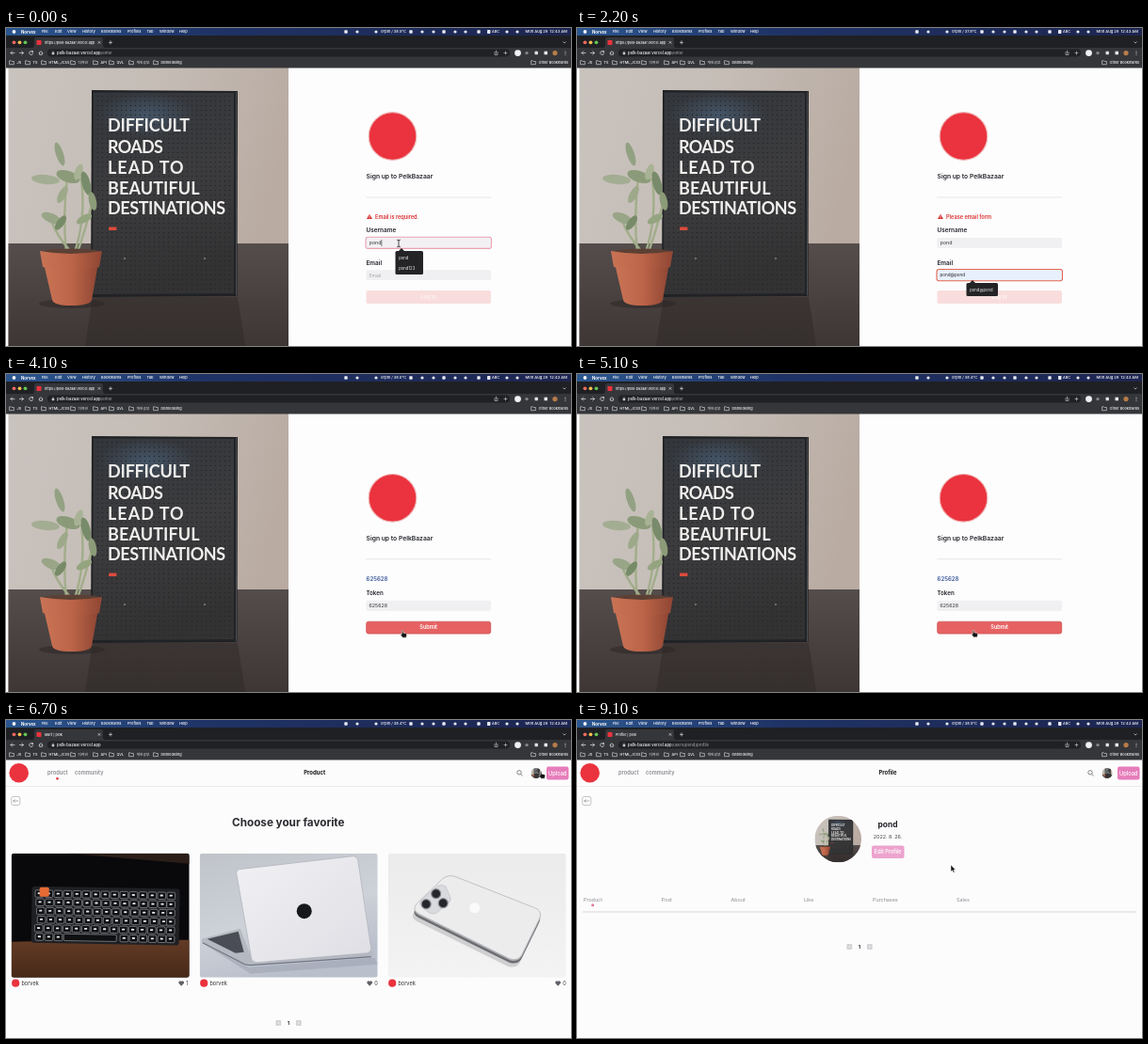
An HTML page for the animation above (9200 ms loop, 600 by 338 pixels).

```html
<!DOCTYPE html>
<html lang="en">
<head>
<meta charset="utf-8">
<title>Market walkthrough</title>
<style>
html, body { margin: 0; width: 100%; height: 100%; overflow: hidden; background: #fdfcfd; }
svg { display: block; width: 600px; height: 338px; font-family: Inter, 'Noto Sans CJK KR', 'Noto Sans CJK', sans-serif; }
text { white-space: pre; }
</style>
</head>
<body>
<svg viewBox="0 0 600 338" xmlns="http://www.w3.org/2000/svg">
<defs>
  <linearGradient id="menubar"><stop stop-color="#2b568f"/><stop offset=".35" stop-color="#1f3366"/><stop offset="1" stop-color="#1d2550"/></linearGradient>
  <linearGradient id="wall" x2="1" y2=".25"><stop stop-color="#c9c3be"/><stop offset=".5" stop-color="#c5bdb6"/><stop offset="1" stop-color="#b9aba2"/></linearGradient>
  <linearGradient id="table" x2="0" y2="1"><stop stop-color="#544d4b"/><stop offset="1" stop-color="#3d3635"/></linearGradient>
  <linearGradient id="board" x2=".2" y2="1"><stop stop-color="#33363b"/><stop offset=".5" stop-color="#3c3c3e"/><stop offset="1" stop-color="#333233"/></linearGradient>
  <radialGradient id="glow"><stop stop-color="#49617a" stop-opacity=".7"/><stop offset="1" stop-color="#49617a" stop-opacity="0"/></radialGradient>
  <linearGradient id="clay" x2="1"><stop stop-color="#c97355"/><stop offset=".5" stop-color="#bd6549"/><stop offset="1" stop-color="#8f4633"/></linearGradient>
  <linearGradient id="wood" x2="0" y2="1"><stop stop-color="#633b25"/><stop offset="1" stop-color="#472919"/></linearGradient>
  <linearGradient id="desk" x2=".4" y2="1"><stop stop-color="#c0c4ca"/><stop offset=".6" stop-color="#cdd1d8"/><stop offset="1" stop-color="#b9bfcb"/></linearGradient>
  <linearGradient id="lid" x2="1" y2="1"><stop stop-color="#f1f1f4"/><stop offset="1" stop-color="#dedee4"/></linearGradient>
  <linearGradient id="paper" x2="0" y2="1"><stop stop-color="#ebebec"/><stop offset="1" stop-color="#f3f3f4"/></linearGradient>
  <linearGradient id="shade" x2="0" y2="1"><stop offset=".66" stop-color="#000" stop-opacity="0"/><stop offset="1" stop-color="#000" stop-opacity=".92"/></linearGradient>
  <pattern id="pegs" width="5" height="5" patternUnits="userSpaceOnUse"><circle cx="2.5" cy="2.5" r=".75" fill="#232427"/></pattern>
  <clipPath id="disc"><circle cx="148" cy="148" r="148"/></clipPath>
  <clipPath id="frame"><rect width="189" height="132" rx="3"/></clipPath>
  <g id="photo"></g>
  <g id="keyboard"></g>
  <g id="laptop">
    <rect width="189" height="132" fill="url(#desk)"/>
    <path d="M4 96L52 121L186 111L189 118L54 128Z" fill="#9ea5b3" opacity=".6"/>
    <path d="M2 91L43 80L56 114L184 104V108Q184 110 180 111L54 119Q50 119 46 117L3 95Z" fill="#b4b8c1"/>
    <path d="M8 91L41 83L47 105L38 106Z" fill="#4a4d55"/>
    <path d="M3 95L46 117Q50 119 54 119L182 110" fill="none" stroke="#6f7481" stroke-width="1.2"/>
    <path d="M42 17L163 3Q167 3 168 7L182 101Q182 105 178 106L61 116Q56 116 55 112L39 21Q39 18 42 17Z" fill="url(#lid)" stroke="#aeb1b9" stroke-width=".7"/>
    <circle cx="111" cy="61.5" r="8" fill="#17181b"/>
  </g>
  <path id="back" d="M31 53L58 27Q64 22 72 25L156 58Q164 61 161 69L142 108Q138 115 129 112L34 65Q24 60 31 53Z"/>
  <g id="phone">
    <rect width="189" height="132" fill="url(#paper)"/>
    <use href="#back" x="-2" y="8" fill="#cfcfd1"/>
    <use href="#back" x="-.3" y="4" fill="#6c6d71"/>
    <use href="#back" y="1.5" fill="#a9aaad"/>
    <use href="#back" fill="#ececed" stroke="#b5b6b9" stroke-width=".8"/>
    <path d="M35 50L52 35Q57 32 61 35L66 46Q68 50 64 53L52 63Q47 66 42 62L35 56Q33 53 35 50Z" fill="#d9dadd" stroke="#bcbdc1" stroke-width=".6"/>
    <g fill="#25262b" stroke="#8d8f95" stroke-width="1.2"><circle cx="51" cy="43" r="5"/><circle cx="40.5" cy="54" r="5"/><circle cx="58.5" cy="53" r="5"/></g>
    <circle cx="92" cy="58" r="5.5" fill="#fafafa"/>
  </g>
</defs>
<g id="stage"></g>
</svg>
<script>
const LOOP = 9200, STEP = 100;
const RED = '#ea333e', GREY = '#8b8b90', INK = '#222429';
const SITE = 'pelk-bazaar.vercel.app';
const $ = id => document.getElementById(id);

// Small drawing helpers: y in text() is the middle of the capitals.
const text = (x, y, size, str, fill = INK, weight = 400, extra = '') =>
  `<text x="${x}" y="${y + size * .36}" font-size="${size}" fill="${fill}" font-weight="${weight}" ${extra}>${str}</text>`;
const centred = (x, y, size, str, fill, weight) => text(x, y, size, str, fill, weight, 'text-anchor="middle"');
const rect = (x, y, w, h, fill, r = 0, extra = '') =>
  `<rect x="${x}" y="${y}" width="${w}" height="${h}" rx="${r}" fill="${fill}" ${extra}/>`;
const dot = (x, y, r, fill, extra = '') => `<circle cx="${x}" cy="${y}" r="${r}" fill="${fill}" ${extra}/>`;
const line = (d, stroke, width = .7) =>
  `<path d="${d}" fill="none" stroke="${stroke}" stroke-width="${width}" stroke-linecap="round" stroke-linejoin="round"/>`;
const during = (t, from, to) => t >= from && t < to;
const latest = (keys, t) => keys.reduce((value, [time, next]) => t >= time ? next : value, keys[0][1]);

function photo() {
  const leaf = (x, y, rx, ry, turn, fill) =>
    `<ellipse cx="${x}" cy="${y}" rx="${rx}" ry="${ry}" fill="${fill}" transform="rotate(${turn} ${x} ${y})"/>`;
  const words = [['DIFFICULT', 104, -.2], ['ROADS', 126.5, -.7], ['LEAD TO', 148.5, 1], ['BEAUTIFUL', 170.5, .1], ['DESTINATIONS', 191.5, -.4]];
  return rect(2.5, 42, 297.5, 296, 'url(#wall)') + rect(2.5, 229, 297.5, 109, 'url(#table)') +
    '<path d="M92 286H246L254 338H84Z" fill="#2e2929" opacity=".5"/>' +
    '<path d="M91 66L246 67L245.5 285L90 286Z" fill="#202225"/><path d="M93 68.5L242 69L242 282L92 283Z" fill="url(#board)"/>' +
    '<ellipse cx="150" cy="92" rx="52" ry="24" fill="url(#glow)"/>' +
    rect(95, 71, 145, 209, 'url(#pegs)') + line('M244.5 68V284', '#53585f', .8) +
    words.map(([s, y, gap]) => text(108, y, 18, s, '#f1efed', 700, `font-family="Lato, sans-serif" letter-spacing="${gap}"`)).join('') +
    rect(109, 211.5, 8.5, 3.5, '#dc4b3d', .8) + dot(126, 245, 1, '#85817e') + dot(211, 245, 1, '#85817e') +
    '<ellipse cx="70" cy="293" rx="35" ry="5" fill="#2b2424" opacity=".5"/>' +
    line('M64 238Q60 202 65 158M73 238Q85 202 80 160M69 238Q54 221 48 205M76 238Q84 216 91 187', '#a1ad8a', 2.4) +
    leaf(57, 134, 4, 13, -18, '#93a183') + leaf(42, 161, 15, 5, 6, '#a3ad92') + leaf(66, 158, 13, 6, 18, '#8b9b79') +
    leaf(77, 153, 4, 9, 20, '#a8b295') + leaf(85, 165, 4.5, 13, -15, '#788b6a') + leaf(60, 177, 4, 10, 28, '#9da98a') +
    leaf(48, 202, 11, 5, 22, '#98a587') + leaf(58, 207, 4, 9, 35, '#778b68') + leaf(83, 203, 9, 4, -28, '#95a480') +
    leaf(92, 184, 4, 10, -12, '#8c9b78') +
    '<path d="M40 250H98L91 289Q89 295 69 295Q51 295 49 289Z" fill="url(#clay)"/>' +
    '<ellipse cx="69" cy="238" rx="31" ry="3.5" fill="#5c4034"/>' +
    '<path d="M36 237Q69 243 102 237L99 254Q69 260 39 254Z" fill="url(#clay)"/>';
}

function keyboard() {
  let keys = '';
  for (let row = 0; row < 6; row++) {
    for (let col = 0; col < 15; col++) {
      if (row === 5 && col > 2 && col < 9) continue;
      const x = 3.5 + col * 10 + (col < 14 ? row % 4 * .9 : 0), y = 4 + row * 9.2;
      keys += rect(x, y, 8.6, 7.4, '#0f1012', 1.2, 'stroke="#b4b7bc" stroke-width=".55"') + rect(x + 2.6, y + 2.5, 3.2, 1.8, '#e4e6ea', .5);
    }
  }
  return rect(0, 0, 189, 132, '#09090b') + '<path d="M60 0H189V11Z" fill="#2b1e19"/>' +
    '<path d="M0 94Q80 92 189 92V132H0Z" fill="url(#wood)"/>' +
    `<g transform="translate(22 35) rotate(1)">${rect(0, 0, 157, 60, '#1f2023', 3)}${keys}` +
    rect(34.5, 50, 56, 7.2, '#0f1012', 1.2, 'stroke="#b4b7bc" stroke-width=".55"') + '</g>' +
    rect(30, 36, 10, 10, '#e56a35', 1.5);
}

const roundPhoto = (x, y, r) =>
  `<g transform="translate(${x - r} ${y - r}) scale(${r / 148})" clip-path="url(#disc)"><use href="#photo" x="-2.5" y="-42"/></g>`;

function browser(t) {
  const heat = latest([[0, '38.5'], [1600, '37.8'], [3100, '38.0'], [5100, '38.4'], [8000, '38.5']], t);
  const title = latest([[0, 'https://' + SITE], [6000, 'Mart | pelk'], [7400, 'https://' + SITE], [7700, 'Profile | pelk']], t);
  const path = latest([[0, '/enter'], [5600, ''], [7400, '/users/pond/profile']], t);
  const menu = [['File', 38], ['Edit', 52], ['View', 65], ['History', 81], ['Bookmarks', 101], ['Profiles', 129], ['Tab', 149.5], ['Window', 163], ['Help', 184]];
  const marks = [['JS', 6], ['TS', 23], ['HTML,JCSS', 40], ['디자인', 71], ['API', 95], ['QVL', 112], ['개인공부', 133], ['DBmodeling', 159], ['Other Bookmarks', 560]];
  const icons = [361, 373, 393, 430, 442, 454, 465, 477, 488, 502, 532, 543];
  const folder = x => line(`M${x - 2} 34.8h1.5l.7.7h2.2v3.2h-4.4z`, '#e4e5e8', .6);
  return rect(0, 0, 600, 8, 'url(#menubar)') + dot(8.5, 4, 1.9, '#f4f4f8') + text(16, 4, 4.4, 'Norvex', '#fff', 700) +
    menu.map(([s, x]) => text(x, 4, 4, s, '#fff', 500)).join('') +
    icons.map((x, i) => i % 3 ? dot(x, 4, 1.6, '#e8eaf4') : rect(x - 1.7, 2.3, 3.4, 3.4, '#e8eaf4', .8)).join('') +
    text(398, 4, 4, `0rpm / ${heat}°C`, '#fff', 500) + rect(511, 2, 3.4, 3.9, '#e8eaf4', .6) +
    text(516, 4, 3.8, 'ABC', '#fff', 500) + text(551.5, 4, 4.1, 'Mon Aug 29  12:43 AM', '#fff', 500) +
    rect(0, 8, 600, 13, '#1f2023') + dot(8.5, 15.3, 1.9, '#ee6a5f') + dot(14.5, 15.3, 1.9, '#f5bd4f') + dot(20.5, 15.3, 1.9, '#61c454') +
    '<path d="M28 21Q30 21 30 18V12Q30 10 32 10H101Q103 10 103 12V18Q103 21 105 21Z" fill="#35363a"/>' +
    rect(32.5, 12.9, 5, 5, RED, .7) + text(41, 15.4, 3.7, title, '#f1f1f3', 500) +
    line('M98 14.4l2 2m0-2l-2 2M111 13.8v3.2m-1.6-1.6h3.2M591.7 14.8l1.3 1.3l1.3-1.3', '#d8d9dc') +
    rect(0, 21, 600, 21.5, '#35363a') + rect(44, 22.5, 491, 8, '#202124', 4) +
    line('M9 26.5H5m1.7-1.7L5 26.5l1.7 1.7M14.5 26.5h4m-1.7-1.7l1.7 1.7l-1.7 1.7M28.5 25.4a2 2 0 1 0 .2 1.7m-.2-2.7v1.2h-1.2M35 26.5l2-1.8l2 1.8m-3.4-.2v2h2.8v-2', '#e4e5e8') +
    rect(48.7, 26, 2.6, 2.2, '#c8c9cc', .3) + line('M49.2 26v-.8q.8-1 1.6 0v.8', '#c8c9cc', .5) +
    `<text x="54" y="28" font-size="4.25" font-weight="500" fill="#f7f7f8">${SITE}<tspan fill="#9a9ca1">${path}</tspan></text>` +
    line('M519 25.5v3h3v-3m-1.5 1.5v-3M529 26.5h3m-1.5-1.6v3.2', '#cfd0d3', .6) + dot(543.5, 26.6, 3.4, '#f1f1f3') +
    dot(553, 26.6, 1.7, '#85878b') + rect(561.5, 24.8, 3.4, 3.4, '#e1e1e4', .6) + rect(571.5, 24.8, 3.5, 3.5, '#ebebee', .3) +
    dot(583, 26.6, 2.6, '#b87c48') + [25, 26.6, 28.2].map(y => dot(594, y, .5, '#ddd')).join('') +
    marks.map(([s, x]) => folder(x) + text(x + 5.5, 37, 3.8, s, '#f4f4f6', 500)).join('');
}

const caret = (x, y) => line(`M${x} ${y - 3}v6`, '#222', .6);

function suggestions(y, width, items) {
  const pitch = 11, height = items.length > 1 ? 25 : 14;
  return `<path d="M417 ${y}l3-3l3 3z" fill="#242426"/>` + rect(413.5, y, width, height, '#242426', 1.5) +
    items.map((s, i) => text(417.3, y + 7 + i * pitch, 4.2, s, '#f2f2f3')).join('');
}

function signup(dy) {
  return '<use href="#photo"/>' + dot(410.5, 115 + dy, 25.3, RED, 'stroke="#efb3b2" stroke-width="1.2"') +
    text(382.5, 158 + dy, 6.75, 'Sign up to PelkBazaar', INK, 600) + line(`M382.5 ${180 + dy}H515`, '#e1e1e4', .8);
}

function loginForm(t) {
  const name = latest([[0, 'pond'], [500, 'pon'], [900, 'pond']], t);
  const email = latest([[0, ''], [1200, 'p'], [1300, 'po'], [1400, 'pon'], [1500, 'pond'], [2000, 'pond@'], [2100, 'pond@po'],
    [2200, 'pond@pond'], [2400, 'pond@pond.'], [2500, 'pond@pond.c'], [2600, 'pond@pond.co'], [2700, 'pond@pond.com']], t);
  const onName = t < 1100, ready = t >= 2700, preview = during(t, 2200, 2400);
  const error = t < 1200 ? 'Email is required.' : 'Please email form';
  const field = (y, focus, fill, ring) => focus
    ? rect(382, y - .8, 133.5, 12.2, fill, 2.5, `stroke="${ring}" stroke-width="1.1"`) : rect(382.5, y, 132.5, 10.8, '#f0f0f2', 1.5);
  const warning = '<path d="M383 203l3-5.2l3 5.2z" fill="#d92d2d"/>' + line('M386 199.7v1.3m0 .9v.1', '#fff', .6) + text(392, 200.5, 5.6, error, '#d92d2d', 600);
  return signup(0) + (ready ? '' : warning) +
    text(382.5, 215, 6.4, 'Username', INK, 600) + field(223, onName, '#f2f0f3', '#eba3b0') + text(385.7, 228.5, 5.3, name, '#333') +
    (onName ? caret(name.length > 3 ? 398.8 : 395.6, 228.5) : '') +
    text(382.5, 249.5, 6.4, 'Email', INK, 600) + field(257.3, !onName, preview ? '#e8f0fe' : '#f3f3f5', '#e5654f') +
    (email ? text(385.5, 262.7, preview ? 4.6 : 5, email, '#222') : text(385.5, 262.7, 5, 'Email', '#a5a5ab')) +
    (during(t, 1500, 1800) ? caret(398, 262.7) : '') +
    rect(382.5, 279, 132.5, 14, ready ? '#e66363' : '#f9dddd', 2) + centred(448.5, 286, 5.5, 'Log in', ready ? '#fff' : '#fdf3f3', 600) +
    (onName ? suggestions(237, 29.5, ['pond', 'pond123']) : during(t, 1200, 2500) ? suggestions(271, 33.5, ['pond@pond']) : '');
}

function tokenForm(t) {
  const code = '625628', typed = code.slice(0, Math.max(0, (t - 3200) / 100));
  return signup(16.8) + text(382.5, 218, 6.1, code, '#3a5899', 600) + text(382.5, 233, 6.2, 'Token', INK, 600) +
    rect(382.5, 240.8, 132.5, 11, '#f0f0f2', 1.5) + text(385.5, 246.4, 5.3, typed || 'Token', typed ? '#333' : '#a5a5ab') +
    rect(382.7, 263.2, 132, 12.8, '#e66262', 2.2, t >= 4000 ? 'stroke="#cf5353" stroke-width=".8"' : '') + centred(448.7, 269.5, 5.5, 'Submit', '#fff', 600);
}

function header(title, active) {
  return rect(0, 42, 600, 296, '#fdfcfd') + line('M0 70.5H600', '#e7e5e7', .7) + dot(13.7, 56.3, 10.3, RED) +
    text(44, 56.3, 5.7, 'product', GREY, 600) + text(73, 56.3, 5.6, 'community', GREY, 600) + (active ? dot(54.5, 62.3, 1.4, '#e5404a') : '') +
    title + '<circle cx="545" cy="55.8" r="2.2" fill="none" stroke="#777" stroke-width=".9"/>' + line('M546.7 57.5l1.7 1.7', '#777', .9) +
    roundPhoto(563, 56.4, 5.6) + rect(574, 49.5, 23.5, 14, '#e67dba', 2) + centred(585.7, 56.5, 5.7, 'Upload', '#fff', 500) +
    rect(5.8, 81.5, 9, 9, '#fff', 1.8, 'stroke="#aaa" stroke-width=".7"') + line('M12.8 86H7.8m1.5-1.4L7.8 86l1.5 1.4', '#777', .6);
}

const pager = y => [289.3, 310.8].map((x, i) => rect(x - 2.9, y - 2.9, 5.8, 5.8, '#d4d2d5', 1) +
  line(i ? `M${x - .5} ${y - 1}l1 1l-1 1` : `M${x + .5} ${y - 1}l-1 1l1 1`, '#fff', .7)).join('') + centred(300, y, 5.3, '1', INK, 700);

function products(hover) {
  const card = (id, i) => {
    const x = 5.7 + i * 200;
    return `<g transform="translate(${x} 141.7)" clip-path="url(#frame)"><use href="#${id}"/>` +
      (hover && i === 2 ? rect(0, 0, 189, 132, 'url(#shade)') + text(5.5, 112.3, 5.6, 'oltone13', '#fff', 500) + rect(173.5, 107.5, 10, 10, RED, 1.5) : '') + '</g>' +
      dot(x + 4.5, 279.7, 4.1, RED) + text(x + 10.7, 279.6, 5.6, 'borvek', '#333') +
      `<path d="M${x + 180.5} 282.7l-2.6-2.8a1.5 1.5 0 0 1 2.6-1.8a1.5 1.5 0 0 1 2.6 1.8z" fill="#5f6066"/>` + text(x + 185.5, 279.6, 5.6, i ? '0' : '1', '#444');
  };
  return header(centred(327.7, 56.3, 6, 'Product', '#111', 700), true) + centred(299.8, 109, 11.7, 'Choose your favorite', '#2b2c30', 700) +
    ['keyboard', 'laptop', 'phone'].map(card).join('') + pager(322);
}

function profile(t) {
  const tabs = [['Product', 7], ['Post', 89.5], ['About', 163.5], ['Like', 241], ['Purchases', 314], ['Sales', 403]];
  return header(centred(330, 56.3, 6, 'Profile', '#111', 700), false) + roundPhoto(277.2, 126.5, 24.8) +
    centred(330, 111.3, 8.4, 'pond', INK, 700) + centred(330, 123.6, 5.4, '2022. 8. 26.', '#444') +
    (t >= 8000 ? rect(313, 133.5, 34.5, 13.5, '#eca3ce', 2) + centred(330.2, 140.2, 5.5, 'Edit Profile', '#fff', 600) : '') +
    tabs.map(([s, x]) => text(x, 191.2, 5.4, s, GREY)).join('') + dot(16.7, 196.8, 1.5, '#e3779b') +
    line('M6.5 204H593.5', '#e5e2e5', 1.6) + pager(241);
}

const statusBar = () => rect(0, 331.5, 200, 6.5, '#28292c', 1) + text(2, 334.8, 3.9, `Waiting for ${SITE}...`, '#e4e4e6');

const POINTER = [[0, 417, 229], [2700, 417, 250], [3000, 421, 284], [3800, 421, 284], [4000, 421, 272], [5600, 421, 271.5],
  [6400, 568, 54], [7200, 568, 54], [7600, 569, 74], [8200, 569, 74], [8600, 397, 154], [LOOP, 397, 154]];
const SHAPES = {
  beam: line('M-1.5 -3.8q1.5 0 1.5 1q0 -1 1.5 -1M0 -3V3M-1.5 3.8q1.5 0 1.5 -1q0 1 1.5 1', '#222', .8),
  arrow: '<path d="M0 0V7.2L1.6 5.8L2.8 8.3L4 7.7L2.9 5.3H5Z" fill="#111" stroke="#fff" stroke-width=".5"/>',
  hand: '<path d="M-.7 1q.8 -1 1.5 0V3.2l3 .7q1 .3 .8 1.3l-.6 3H.2L-1.8 5.5q-.3 -1.2 1.1 -.7z" fill="#111" stroke="#fff" stroke-width=".5"/>'
};

function pointerAt(t) {
  const i = POINTER.findIndex(([time]) => time > t);
  const [t0, x0, y0] = POINTER[i - 1], [t1, x1, y1] = POINTER[i];
  const k = (t - t0) / (t1 - t0);
  return [x0 + (x1 - x0) * k, y0 + (y1 - y0) * k];
}

function pointer(t) {
  const shape = latest([[0, 'beam'], [300, ''], [2700, 'arrow'], [3000, 'hand'], [3300, ''], [3900, 'hand'],
    [5800, 'arrow'], [6400, 'hand'], [7500, 'arrow']], t);
  return shape ? `<g transform="translate(${pointerAt(t)})">${SHAPES[shape]}</g>` : '';
}

function scene(t) {
  if (t < 3200) return loginForm(t);
  if (t < 5600) return tokenForm(t);
  if (t < 7400) return products(pointerAt(t)[1] > 142);
  return profile(t);
}

$('photo').innerHTML = photo();
$('keyboard').innerHTML = keyboard();
let shown = -1;
function draw(now) {
  const t = Math.floor(now % LOOP / STEP) * STEP;
  if (t !== shown) {
    const waiting = during(t, 5600, 6000) || during(t, 7400, 7700);
    $('stage').innerHTML = rect(0, 42, 600, 296, '#fdfdfe') + scene(t) + browser(t) + (waiting ? statusBar() : '') + pointer(t);
    shown = t;
  }
}
const start = performance.now();
function tick() {
  draw(performance.now() - start);
  requestAnimationFrame(tick);
}
tick();
</script>
</body>
</html>
```
